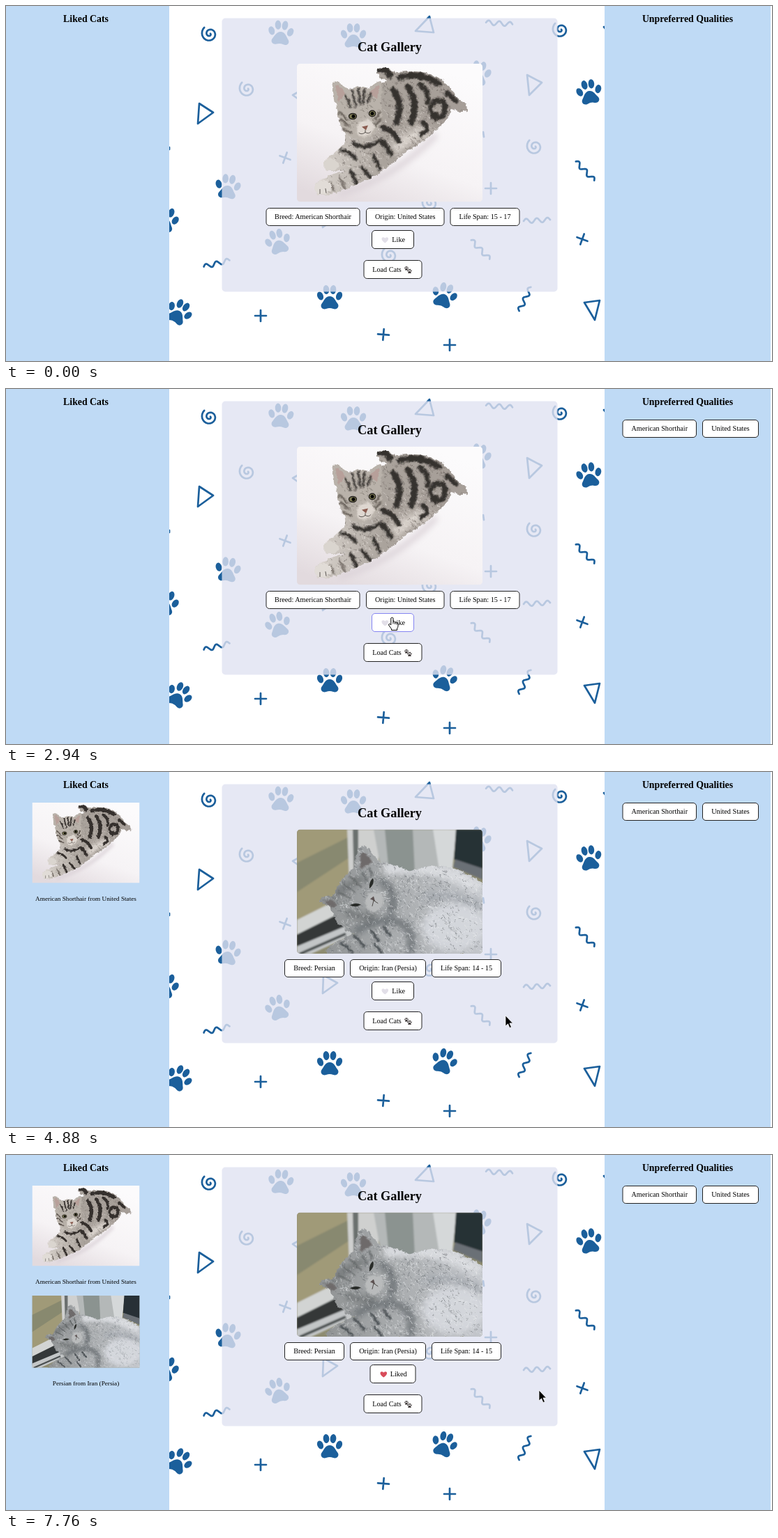
Recreate the animation shown at these times as an HTML page. Size 1098x510 px, loop 8 s.

```html
<!DOCTYPE html>
<html lang="en">
<head>
<meta charset="utf-8">
<title>Cat Gallery</title>
<style>
  html, body { margin: 0; width: 100%; height: 100%; overflow: hidden; background: #fff; }
  svg { display: block; }
  #stage { position: absolute; left: 0; top: 0; }
  text { font-family: "Liberation Serif", "Times New Roman", serif; font-size: 10.2px; fill: #000; text-anchor: middle; }
  .title { font-weight: bold; font-size: 18.3px; }
  .heading { font-weight: bold; font-size: 13.8px; }
  .caption { font-size: 9.22px; }
  .line { fill: none; stroke: #1b5f9b; stroke-width: 2.7; stroke-linecap: round; stroke-linejoin: round; }
  .stripe { fill: none; stroke: #35302d; stroke-linecap: round; stroke-linejoin: round; }
  .hairs { fill: none; stroke-width: .9; opacity: .55; }
</style>
</head>
<body>
<svg id="stage" width="1098" height="510" viewBox="0 0 1098 510">
  <defs>
    <g id="paw">
      <path d="M0-2C6-2 8 4 11 8C15 13 10 18 5 16Q0 14-5 16C-10 18-15 13-11 8C-8 4-6-2 0-2Z"/>
      <ellipse cx="-13.5" cy="-2.5" rx="4.3" ry="6.2" transform="rotate(-22 -13.5 -2.5)"/>
      <ellipse cx="-5" cy="-11.5" rx="4.3" ry="6.6" transform="rotate(-6 -5 -11.5)"/>
      <ellipse cx="5" cy="-11.5" rx="4.3" ry="6.6" transform="rotate(6 5 -11.5)"/>
      <ellipse cx="13.5" cy="-2.5" rx="4.3" ry="6.2" transform="rotate(22 13.5 -2.5)"/>
    </g>
    <path id="heart" d="M0 4.6C-8-.5-4.6-6 0-2.6C4.6-6 8-.5 0 4.6Z"/>
    <filter id="fur" color-interpolation-filters="sRGB">
      <feTurbulence type="fractalNoise" baseFrequency=".16" numOctaves="3" seed="4"/>
      <feDisplacementMap in="SourceGraphic" scale="6" xChannelSelector="R" yChannelSelector="G"/>
      <feGaussianBlur stdDeviation=".45"/>
    </filter>
    <filter id="soft"><feGaussianBlur stdDeviation="1"/></filter>
    <filter id="haze" x="-50%" y="-50%" width="200%" height="200%"><feGaussianBlur stdDeviation="5"/></filter>
    <linearGradient id="sheet" x1=".7" y1="0" x2=".2" y2="1">
      <stop offset="0" stop-color="#fcfbfc"/><stop offset=".6" stop-color="#f6f3f5"/><stop offset="1" stop-color="#e2dade"/>
    </linearGradient>
    <linearGradient id="silver"><stop offset="0" stop-color="#dad4ce"/><stop offset=".45" stop-color="#aaa39c"/><stop offset="1" stop-color="#a59d97"/></linearGradient>
    <linearGradient id="grey"><stop offset="0" stop-color="#8f9293"/><stop offset=".45" stop-color="#a8abad"/><stop offset="1" stop-color="#c4c7cc"/></linearGradient>
    <path id="tabbyShape" d="M104 48Q112 28 130 26Q114 20 116 10Q122 3 134 8Q136 14 150 12Q186 8 208 24Q222 34 228 48Q246 60 245 68Q234 72 222 66Q216 84 200 95Q182 114 156 126Q120 164 60 184Q50 190 30 189Q22 182 28 172Q46 158 80 152Q66 156 44 154Q34 148 42 138Q58 126 70 112Q62 80 104 48Z"/>
    <path id="persianShape" d="M33 104Q34 94 52 95Q60 72 82 56Q83 30 95 22Q107 28 114 45Q140 50 162 60Q205 45 240 62L268 78V180H38Q50 160 82 150Q52 138 49 112Z"/>
    <clipPath id="tabbyClip"><use href="#tabbyShape"/></clipPath>
    <clipPath id="persianClip"><use href="#persianShape"/></clipPath>
    <clipPath id="tabbyFrame"><rect x="417" y="82.5" width="266" height="199" rx="5"/></clipPath>
    <clipPath id="persianFrame"><rect x="417" y="82.5" width="266" height="178.5" rx="5"/></clipPath>
    <clipPath id="middle"><rect x="234" width="624" height="510"/></clipPath>

    <symbol id="tabby" viewBox="0 0 266 199" preserveAspectRatio="none">
      <rect width="266" height="199" fill="url(#sheet)"/>
      <path d="M60 188Q140 165 200 102" fill="none" stroke="#d9d0d6" stroke-width="7" filter="url(#haze)"/>
      <g filter="url(#fur)">
        <use href="#tabbyShape" fill="url(#silver)"/>
        <g clip-path="url(#tabbyClip)">
          <path d="M140 125Q165 98 190 100" fill="none" stroke="#d8d1cb" stroke-width="16" filter="url(#haze)"/>
          <path class="hairs" data-area="30 5 220 180" stroke="#645d58"/>
          <path class="hairs" data-area="30 60 190 125" stroke="#ece7e2"/>
          <g filter="url(#soft)">
            <path class="stripe" stroke-width="9" d="M117 9Q129 6 133 17M148 20Q174 11 203 29M138 38Q153 58 143 84M159 34Q175 56 164 84"/>
            <path class="stripe" stroke-width="7" d="M177 31Q190 40 187 55M198 80Q185 64 199 53Q215 52 212 68Q208 82 198 74M215 42L228 54M180 85Q194 92 178 102M124 92Q140 98 146 112M122 111L135 130"/>
            <path class="stripe" stroke-width="5" d="M110 132L119 152M93 149L105 163M77 154L86 173M64 125Q78 128 84 137M80 114Q98 126 118 111"/>
            <path class="stripe" style="stroke:#6d655f" stroke-width="3" d="M62 164L69 180M48 171L53 183"/>
          </g>
          <ellipse cx="36" cy="178" rx="14" ry="10" fill="#e1dcd7"/>
          <ellipse cx="47" cy="145" rx="13" ry="9" fill="#dad5cf"/>
        </g>
        <path d="M58 66Q50 44 52 25Q65 28 74 38Q88 30 103 36Q110 27 121 25Q125 42 119 57Q128 82 112 99Q99 113 82 107Q61 102 58 66Z" fill="#b9b2aa"/>
        <path d="M55 31Q64 34 69 43L60 56ZM118 31Q108 35 104 43L115 51Z" fill="#b7a09a"/>
        <path class="hairs" data-area="62 43 52 55" stroke="#6b645d"/>
        <g filter="url(#soft)">
          <path class="stripe" stroke-width="3" d="M79 38L84 61M88 36L90 58M97 38L95 58M70 46L77 62M106 43L102 56"/>
          <path class="stripe" style="stroke:#5c544e" stroke-width="2.6" d="M61 70L73 81M62 81L75 90M119 70L113 80M120 80L112 88M66 94L78 99"/>
        </g>
        <path d="M89 84Q98 78 108 83Q115 96 103 104Q92 108 85 98Z" fill="#ded7d0" filter="url(#soft)"/>
      </g>
      <g fill="#7c7951" stroke="#24211f" stroke-width="1.4"><ellipse cx="80" cy="76" rx="5.4" ry="4"/><ellipse cx="108" cy="72" rx="4.6" ry="4.2"/></g>
      <circle cx="81" cy="76" r="2.5"/><circle cx="108" cy="72" r="2.5"/>
      <path d="M93 91L102 89L99 96Z" fill="#8a5c50"/>
      <path class="stripe" stroke-width=".8" d="M98 96V99Q93 103 89 100M98 99Q103 102 106 98M33 181V187M41 180L42 186"/>
    </symbol>

    <symbol id="persian" viewBox="0 0 266 178.5" preserveAspectRatio="none">
      <rect width="266" height="179" fill="#8d8b70"/>
      <g filter="url(#soft)">
        <path d="M0 0H75L78 115L0 150Z" fill="#a09a78"/>
        <path d="M0 48L76 10V40L0 90Z" fill="#88896f"/>
        <path d="M72 0H117V100H76Z" fill="#cfd0cf"/>
        <path d="M80 0H88V80H82Z" fill="#6a6f6e"/>
        <path d="M110 0H218V66H122Z" fill="#b4b8b8"/>
        <path d="M126 0H166L169 62H132Z" fill="#8b9390"/>
        <path d="M195 0H229L222 65H205Z" fill="#d5d8d9"/>
        <path d="M228 0H266V58L225 43Z" fill="#273036"/>
        <path d="M227 43L266 56V72L224 54Z" fill="#6a7076"/>
        <path d="M0 130L50 105L85 145L0 179Z" fill="#d2d4d3"/>
        <path d="M0 151L58 122L73 143L0 172Z" fill="#343839"/>
        <path d="M0 168L74 137L81 151L20 179H0Z" fill="#c3c6c7"/>
        <path d="M4 179L70 150" stroke="#4a4f50" stroke-width="4"/>
      </g>
      <g filter="url(#fur)">
        <use href="#persianShape" fill="url(#grey)"/>
        <g clip-path="url(#persianClip)">
          <g filter="url(#haze)">
            <path d="M125 58Q195 44 262 84" fill="none" stroke="#d9dbdf" stroke-width="18"/>
            <ellipse cx="225" cy="140" rx="45" ry="34" fill="#d3d6db"/>
            <path d="M118 70Q150 96 132 124M82 148Q120 122 152 136Q172 152 160 180" fill="none" stroke="#686d71" stroke-width="9"/>
            <path d="M52 98Q68 80 98 70M70 118Q92 130 112 122" fill="none" stroke="#737778" stroke-width="10"/>
            <path d="M178 100Q215 86 266 112" fill="none" stroke="#a0a5ab" stroke-width="9"/>
          </g>
          <path class="hairs" data-area="30 20 236 155" stroke="#62676b"/>
          <path class="hairs" data-area="30 20 236 155" stroke="#dcdee1"/>
          <path class="hairs" data-area="110 50 155 125" stroke="#eceef0"/>
          <path d="M91 33Q101 34 108 47L90 58ZM38 103Q50 98 57 108L50 113Z" fill="#6e6b6b" filter="url(#soft)"/>
          <path d="M100 94Q114 84 124 95Q126 113 111 119Q99 119 98 107Z" fill="#b9bbbc" filter="url(#soft)"/>
          <g filter="url(#soft)">
            <path class="stripe" style="stroke:#616566" stroke-width="2" d="M76 67L91 82M67 78L83 91M61 91L76 98M94 61L101 74M105 55L107 68"/>
            <path class="stripe" style="stroke:#4f5458" stroke-width="4" d="M65 163L80 177M83 153L97 169M106 145L117 160M124 140L134 152M112 165L122 178"/>
          </g>
        </g>
      </g>
      <path d="M76 109Q83 104 92 108Q84 113 76 109ZM104 85Q103 75 109 70Q112 78 104 85Z" fill="#292c29"/>
      <path d="M105 100L110 96L112 103Z" fill="#5e5353"/>
      <path class="stripe" stroke-width=".8" d="M110 102L116 106M110 102L108 110"/>
    </symbol>
  </defs>

  <rect width="1098" height="510" fill="#fff"/>
  <g id="pattern" clip-path="url(#middle)"></g>
  <path d="M0 0H234V510H0ZM858 0H1096V510H858Z" fill="#bfdaf5"/>
  <text class="heading" x="114.5" y="23">Liked Cats</text>
  <text class="heading" x="977" y="23">Unpreferred Qualities</text>
  <rect id="panel" x="309.5" y="17.5" width="481" height="393" rx="5" fill="rgb(224,227,242)" fill-opacity=".8"/>
  <text class="title" x="550" y="65">Cat Gallery</text>
  <g id="tabbyMain" clip-path="url(#tabbyFrame)"><use href="#tabby" x="417" y="82.5" width="266" height="199"/></g>
  <g id="persianMain" clip-path="url(#persianFrame)"><use href="#persian" x="417" y="82.5" width="266" height="178.5"/></g>
  <g id="tabbyLiked">
    <use href="#tabby" x="37.5" y="44" width="154" height="115.5"/>
    <text class="caption" x="114.5" y="185">American Shorthair from United States</text>
  </g>
  <g id="persianLiked">
    <use href="#persian" x="37.5" y="202" width="154" height="103.5"/>
    <text class="caption" x="114.5" y="331">Persian from Iran (Persia)</text>
  </g>
  <g id="chips"></g>
  <path id="arrow" d="M0 0V15L3.5 11.8L6 17.6L8.4 16.5L5.9 10.9H10.4Z" fill="#000" stroke="#fff" stroke-width=".7"/>
  <path id="hand" d="M-1.6 11V1.2Q0-.8 1.6 1.2V6.5Q3.4 5.4 4.3 7Q6 6.4 6.8 7.8Q8.6 7.6 8.6 9.5V12.5Q8.4 15 7.2 16V18.5H-.8V16.8L-5 11Q-4.6 8.6-2.8 9.8ZM1.6 6.5V9.5M4.3 7V10M6.8 7.8V10.5" fill="#fff" stroke="#000"/>
</svg>
<script>
const $ = id => document.getElementById(id);
const show = (id, on) => $(id).setAttribute('display', on ? 'inline' : 'none');
const curve = (n, point) => 'M' + Array.from({ length: n + 1 }, (_, i) => point(i / n).map(v => v.toFixed(1))).join('L');

// Wallpaper
const spiral = curve(40, u => {
  const angle = 4 - (1 - u) * 10.5, radius = 1 + u * 11;
  return [radius * Math.cos(angle), radius * Math.sin(angle)];
});
const wave = curve(40, u => [u * 38 - 19, -3.2 * Math.sin(u * 15.7)]);
const plus = 'M-8 0H8M0-8V8';
const place = (list, draw) => list.map(([x, y, turn = 0]) =>
  `<g transform="translate(${x} ${y}) rotate(${turn})">${draw}</g>`).join('');
const line = d => `<path class="line" d="${d}"/>`;
$('pattern').innerHTML =
  place([[394, 39, 5], [498, 43], [677, 97, 10], [836, 124, -10], [318, 260, 8], [229, 307, 15],
    [390, 339, -15], [464, 419], [628, 416, 18], [248, 440, 30]], '<use href="#paw" fill="#1b5f9b"/>') +
  place([[292, 40], [346, 119], [795, 34], [758, 202], [608, 283], [550, 358]], line(spiral)) +
  place([[707, 25, 4], [302, 370, -14], [830, 237, 46], [761, 308, -3], [680, 350, 46], [744, 421, -64]], line(wave)) +
  place([[400, 218, 20], [695, 262], [826, 335, 20], [365, 445], [541, 472, 5], [636, 487]], line(plus)) +
  line('M277 140L297 153L275 169ZM607 15L613 38L587 36ZM747 99L768 110L750 128ZM455 292L475 303L454 318Z' +
    'M829 426L851 423L844 451ZM411 128L425 120L425 138ZM234 203V206M857 30L860 34M684 181L685 188');

// Short seeded strokes that give the coats their grain
let seed = 7;
const random = () => (seed = seed * 16807 % 2147483647) / 2147483647;
document.querySelectorAll('.hairs').forEach(path => {
  const [x, y, w, h] = path.dataset.area.split(' ').map(Number);
  let d = '';
  for (let i = 0; i < w * h / 45; i++)
    d += `M${(x + random() * w).toFixed(1)} ${(y + random() * h).toFixed(1)}l${(random() * 6 - 1).toFixed(1)} ${(random() * 5).toFixed(1)}`;
  path.setAttribute('d', d);
});

// Pointer moves: start, end, number of steps, points to pass
const moves = [
  [180, 920, 10, [760, 372], [600, 350], [500, 390]],
  [990, 1470, 8, [468, 303]],
  [1670, 2050, 6, [573, 302]],
  [2530, 3010, 7, [553, 328.5]],
  [3270, 3540, 4, [556, 373]],
  [3810, 4150, 5, [716, 350]],
  [5680, 6080, 6, [640, 330], [556, 352]],
  [6280, 6610, 6, [562, 323]],
  [6750, 7010, 4, [556, 353]],
  [7360, 7760, 6, [764, 338]]
];

function pointerAt(t) {
  let at = [1453, 658];
  for (const [start, end, steps, ...path] of moves) {
    if (t < start) break;
    const step = Math.floor((t - start) / (end - start) * (steps - 1) + 1e-6) + 1;
    const eased = 1 - (1 - Math.min(1, step / steps)) ** 2;
    const points = [at, ...path];
    const u = eased * path.length, i = Math.min(Math.floor(u), path.length - 1);
    at = points[i].map((v, k) => v + (points[i + 1][k] - v) * (u - i));
  }
  return at;
}

function draw(t) {
  const [px, py] = pointerAt(t);
  const second = t >= 4750;
  const liked = second ? t >= 6560 : t >= 3010;
  const lift = second ? 21 : 0;
  let hovering = false;

  const chip = (x, y, w, h, label, textX = x + w / 2, extra = '') => {
    const hover = t >= 180 && px >= x && px <= x + w && py >= y && py <= y + h;
    hovering ||= hover;
    return `<rect x="${x}" y="${y}" width="${w}" height="${h}" rx="4.5" fill="#fff" stroke="${hover ? '#8585f2' : '#222'}"/>
      <text x="${textX}" y="${y + h / 2 + 3.3}">${label}</text>${extra}`;
  };
  const heart = (x, color) => `<use href="#heart" x="${x}" y="${336 - lift}" fill="${color}"/>`;
  const smallPaw = (x, y, size) => `<use href="#paw" fill="#3a3434" transform="translate(${x} ${y - lift}) scale(${size})"/>`;

  const info = second
    ? [[399.5, 85, 'Breed: Persian'], [493.5, 108, 'Origin: Iran (Persia)'], [610.5, 99, 'Life Span: 14 - 15']]
    : [[373, 134, 'Breed: American Shorthair'], [516.5, 111.5, 'Origin: United States'], [637, 99, 'Life Span: 15 - 17']];
  let chips = info.map(([x, w, label]) => chip(x, 290.5 - lift, w, 25, label)).join('');
  chips += liked
    ? chip(522, 322.5 - lift, 65, 26, 'Liked', 562.7, heart(541.3, '#d84c5a'))
    : chip(524.5, 322.5 - lift, 60, 26, 'Like', 562.7, heart(543.3, '#e2dfe8'));
  chips += chip(513, 365.5 - lift, 83, 26, 'Load Cats', 546, smallPaw(574, 377, .16) + smallPaw(578.5, 381, .18));
  if (t >= 1470) chips += chip(t >= 2050 ? 884 : 928.5, 44.5, 105.5, 25, 'American Shorthair');
  if (t >= 2050) chips += chip(998.5, 44.5, 80, 25, 'United States');
  if (chips !== draw.last) $('chips').innerHTML = draw.last = chips;

  $('panel').setAttribute('height', 393 - lift);
  show('tabbyMain', !second);
  show('persianMain', second);
  show('tabbyLiked', t >= 3010);
  show('persianLiked', t >= 6560);
  show('arrow', t >= 180 && !hovering);
  show('hand', hovering);
  for (const id of ['arrow', 'hand']) $(id).setAttribute('transform', `translate(${px} ${py})`);
}

function tick() {
  draw(performance.now() % 8000);
  requestAnimationFrame(tick);
}
tick();
</script>
</body>
</html>
```
